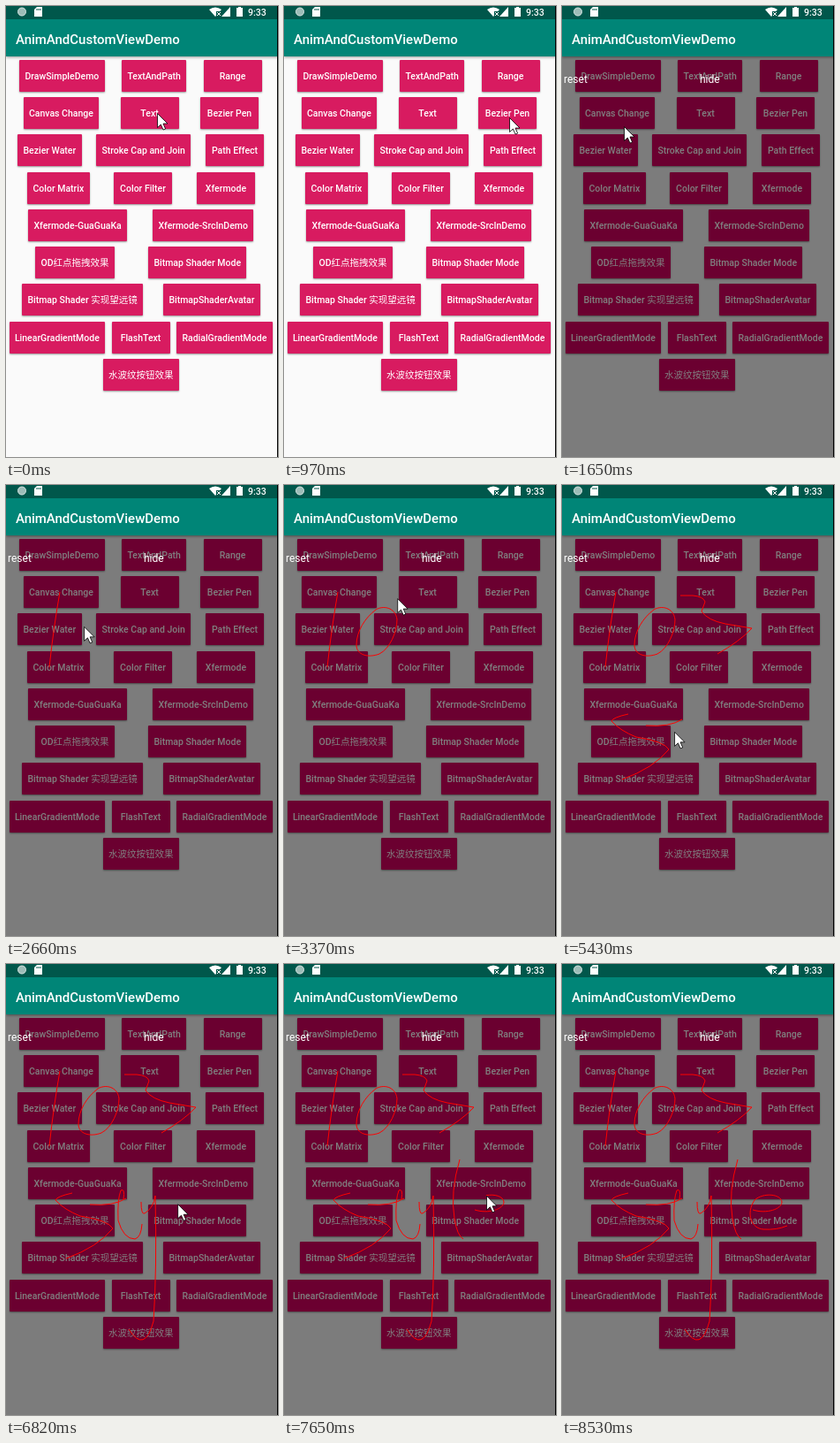
An HTML page for the animation above (9340 ms loop, 308 by 510 pixels).

```html
<!DOCTYPE html>
<html lang="en">
<head>
<meta charset="utf-8">
<title>AnimAndCustomViewDemo</title>
<style>
html, body { margin: 0; width: 100%; height: 100%; overflow: hidden; }
body { position: relative; background: #fafafa; color: #fff; font: 500 10.5px/38px Roboto, "Noto Sans CJK SC", "Noto Sans CJK", sans-serif; }
div, svg { position: absolute; }
#bar { left: 0; top: 0; width: 308px; height: 57px; background: linear-gradient(#00574b 15px, #008577 15px); box-shadow: 0 1px 3px #0006; }
#title { left: 11px; top: 19px; font-size: 15px; }
#clock { left: 274px; top: -11px; }
.btn { box-sizing: border-box; height: 36px; min-width: 66px; padding: 0 6.4px; text-align: center; white-space: nowrap; background: #d81b60; border-radius: 1px; box-shadow: 0 1px 2px #0006; }
.btn span { font-weight: 400; }
.dimmed .btn { background: #d80060; }
#dim { display: none; left: 0; top: 57px; width: 307px; height: 453px; background: #00000080; font-size: 12px; font-weight: 400; }
.dimmed #dim { display: block; }
#dim div { top: 7px; }
#edge { left: 307px; top: 0; width: 1px; height: 510px; background: #000; }
svg { left: 0; top: 0; }
</style>
</head>
<body>
<div id="buttons"></div>
<div id="bar"><div id="title">AnimAndCustomViewDemo</div><div id="clock">9:33</div></div>
<div id="dim"><div style="left:2px">reset</div><div style="left:156px">hide</div></div>
<div id="edge"></div>
<svg width="308" height="510" fill="none">
  <g fill="#fff">
    <circle cx="18" cy="6.5" r="4.5" fill="#9dbdb8" stroke="#d5e4e2"/>
    <path d="M35 1h6v11h-9V4zM230 4Q237-1 244 4L237 12ZM254 1v11h-10zM263 1h3v1h2v10h-7V2h2z"/>
    <path d="M35 3v2M37 3v2M39 3v2" stroke="#00574b"/>
    <path d="M238 6h6v6h-6z" fill="#00574b"/>
    <path d="M239 7l4 4M243 7l-4 4" stroke="#fff"/>
  </g>
  <g id="ink" stroke="#f00"></g>
  <path id="cursor" d="M.5 .5V16.5L4.3 13L7 19L9.6 18L7 12H12Z" fill="#fff" stroke="#000" stroke-width=".8"/>
</svg>
<script>
const LOOP = 9340, DIM_AT = 1150;
const $ = id => document.getElementById(id);

const rows = [
  [[15, "DrawSimpleDemo"], [131, "TextAndPath"], [223.5, "Range"]],
  [[19.5, "Canvas Change"], [129.5, "Text"], [220, "Bezier Pen"]],
  [[13, "Bezier Water"], [102, "Stroke Cap and Join"], [226, "Path Effect"]],
  [[24, "Color Matrix"], [122, "Color Filter"], [216, "Xfermode"]],
  [[25, "Xfermode-GuaGuaKa"], [166, "Xfermode-SrcInDemo"]],
  [[33, "OD红点拖拽效果"], [161, "Bitmap Shader Mode"]],
  [[18, "Bitmap Shader 实现望远镜"], [178, "BitmapShaderAvatar"]],
  [[3.5, "LinearGradientMode"], [119.5, "FlashText"], [193, "RadialGradientMode"]],
  [[109.5, "水波纹按钮效果"]]
];
$("buttons").innerHTML = rows.map((row, i) => row.map(([x, label]) =>
  `<div class="btn" style="left:${x}px;top:${Math.round(60.9 + i * 42.25)}px">` +
  label.replace(/[\u4e00-\u9fff]+/g, "<span>$&</span>") + "</div>").join("")).join("");

// Pen strokes: start time, end time, path
const strokes = [
  [2080, 2420, "M61 121Q54 160 49 206"],
  [2780, 3250, "M104 141C112 136 126 138 128 152C128 166 120 185 108 191C95 196 82 192 82 181C82 165 92 150 104 141"],
  [3400, 4080, "M134 125H148Q160 126 162 132L158 143Q165 153 185 157L215 162Q201 177 176 191"],
  [4330, 4840, "M75 259Q57 263 56 267Q66 278 84 285Q116 290 121 299Q104 320 68 333"],
  [5150, 5340, "M95 272Q122 274 136 265"],
  [5520, 5830, "M133 266Q135 253 130 256Q126 266 127 290Q133 311 146 311Q153 309 154 294"],
  [5860, 6560, "M153 269Q153 284 157 282Q167 276 169 262Q171 345 167 404Q157 441 139 413"],
  [6850, 7180, "M199 221Q188 258 193 288Q196 307 203 311"],
  [7420, 7960, "M216 278C232 283 249 277 249 269C248 260 228 258 218 267C208 282 214 299 228 300Q243 301 255 296"]
].map(([start, end, d]) => {
  const path = document.createElementNS("http://www.w3.org/2000/svg", "path");
  path.setAttribute("d", d);
  $("ink").append(path);
  return { start, end, path, length: path.getTotalLength() };
});

// Cursor stops with the pen lifted: time, x, y
const stops = [
  [0, 171, 121], [60, 171, 121], [180, 182, 131], [420, 225, 101], [640, 254, 125],
  [900, 254, 125], [970, 255, 126], [1150, 255, 126], [1650, 70, 136], [2660, 88, 160],
  [4140, 122, 246], [4900, 67, 313], [5430, 127, 279], [6820, 194, 273],
  [8530, 284, 512], [LOOP, 284, 512]
];
for (const { start, end, path, length } of strokes) {
  const a = path.getPointAtLength(0), b = path.getPointAtLength(length);
  stops.push([start, a.x, a.y], [end, b.x, b.y]);
}
stops.sort((a, b) => a[0] - b[0]);

function cursorAt(t) {
  const s = strokes.find(s => t >= s.start && t < s.end);
  if (s) return s.path.getPointAtLength(s.length * (t - s.start) / (s.end - s.start));
  const i = stops.findIndex(p => p[0] > t);
  const [t0, x0, y0] = stops[i - 1], [t1, x1, y1] = stops[i];
  const k = (t - t0) / (t1 - t0);
  return { x: x0 + (x1 - x0) * k, y: y0 + (y1 - y0) * k };
}

function draw(now) {
  const t = now % LOOP;
  document.body.classList.toggle("dimmed", t >= DIM_AT);
  for (const { start, end, path, length } of strokes) {
    const k = Math.min(1, (t - start) / (end - start));
    path.style.display = k > 0 ? "" : "none";
    path.style.strokeDasharray = k < 1 ? `${Math.max(0, k) * length} ${length}` : "none";
  }
  const { x, y } = cursorAt(t);
  $("cursor").setAttribute("transform", `translate(${x} ${y})`);
}

const begin = performance.now();
function tick() {
  draw(performance.now() - begin);
  requestAnimationFrame(tick);
}
tick();
</script>
</body>
</html>
```
